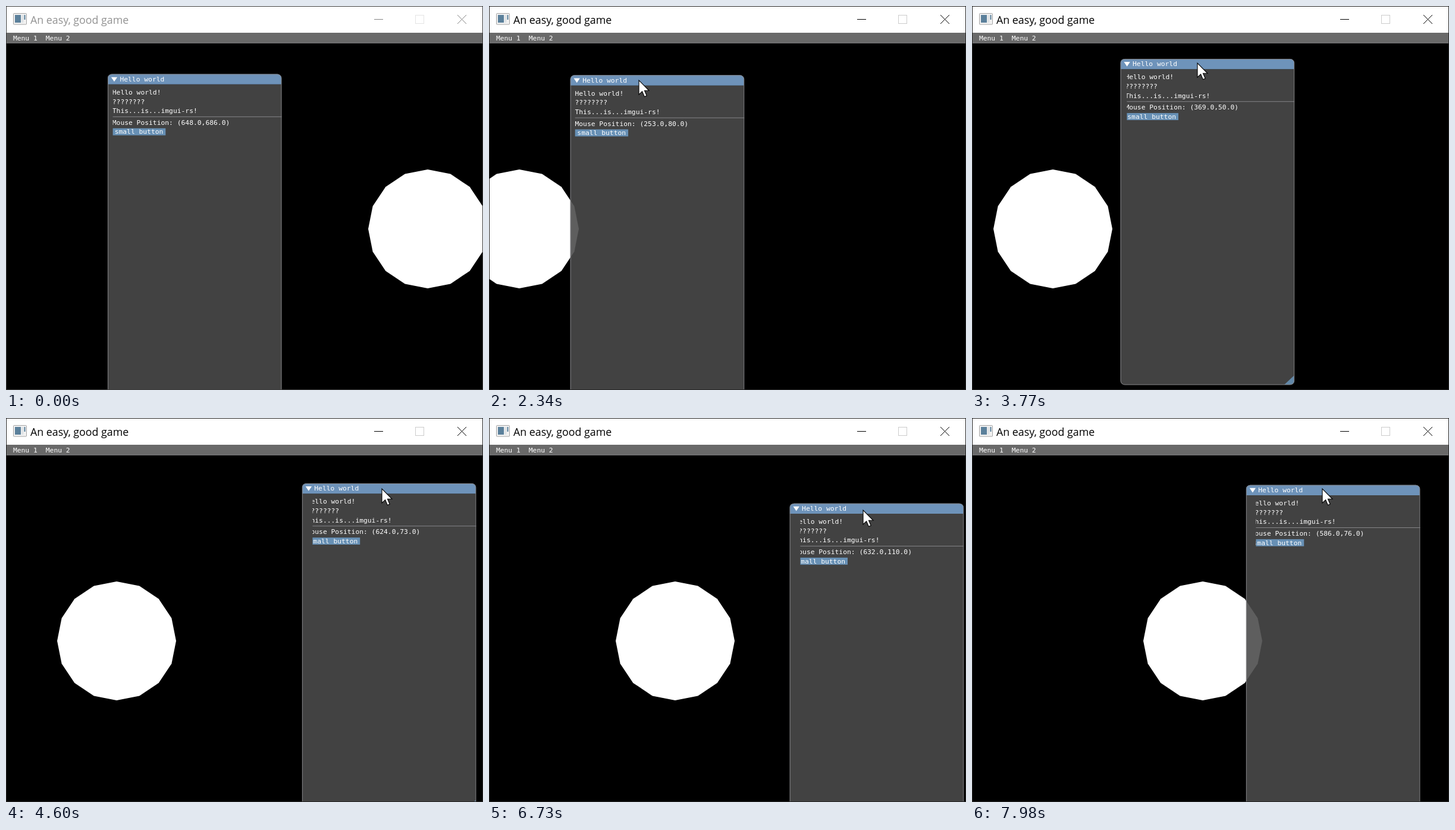
Recreate the animation shown at these times as an HTML page. Size 802 by 646 pixels, loop 8 s.

```html
<!DOCTYPE html>
<html lang="en">
<head>
<meta charset="utf-8">
<title>An easy, good game</title>
<style>
  html, body { margin: 0; width: 100%; height: 100%; overflow: hidden; background: #000; }
  svg { display: block; width: 100vw; height: 100vh; }
  .ui { font: 11.63px "DejaVu Sans Mono", monospace; fill: #fff; }
  .caption { font: 17.8px "Open Sans", "Noto Sans", sans-serif; }
  .line { fill: none; stroke: #858588; stroke-width: 1; vector-effect: non-scaling-stroke; }
</style>
</head>
<body>
<svg viewBox="0 0 802 646">
  <defs>
    <clipPath id="client"><rect x="1" y="45" width="800" height="600"/></clipPath>
    <clipPath id="stage"><rect x="1" y="1" width="800" height="644"/></clipPath>
    <clipPath id="inner"><rect id="innerRect" y="45" width="296" height="600"/></clipPath>
  </defs>

  <rect width="802" height="646" fill="#000"/>

  <g clip-path="url(#client)">
    <polygon id="ball" fill="#fff"/>

    <g class="ui" transform="translate(1 45) scale(.9735 .9135)">
      <rect width="822" height="19" fill="#696969"/>
      <path class="line" d="M0 18.8H822"/>
      <text x="11.2" y="13.7">Menu 1</text>
      <text x="67.6" y="13.7">Menu 2</text>
    </g>

    <g class="ui panel">
      <path d="M0 19V593a7 7 0 0 0 7 7H293a7 7 0 0 0 7-7V19z" fill="#4b4b4b" fill-opacity=".89"/>
      <path d="M0 19V7a7 7 0 0 1 7-7H293a7 7 0 0 1 7 7V19z" fill="#6e93ba"/>
      <path d="M300 583V593a7 7 0 0 1-7 7H283z" fill="#6288a8"/>
      <rect class="line" x=".5" y=".5" width="299.5" height="599.5" rx="7"/>
      <path d="M6 5.6H16.6L11.3 14z"/>
      <text x="21" y="13.7">Hello world</text>
    </g>

    <g clip-path="url(#inner)">
      <g class="ui panel">
        <text x="8" y="37.8">Hello world!</text>
        <text x="8" y="54.8">????????</text>
        <text x="8" y="71.8">This...is...imgui-rs!</text>
        <path class="line" d="M8 78.6H300.5"/>
        <text id="mouse" x="8" y="93.6"></text>
        <rect x="8" y="99.8" width="92" height="13" fill="#6790b5"/>
        <text x="12" y="110.4">small button</text>
      </g>
    </g>
  </g>

  <rect x="1" y="1" width="800" height="44" fill="#fff"/>
  <g>
    <rect x="12.5" y="12.5" width="22" height="18.5" rx="1" fill="#f2f2f2" stroke="#a3a3a3"/>
    <rect x="15" y="15" width="10" height="13" fill="#5b809b"/>
    <rect x="26" y="15" width="3.5" height="13" fill="#dfe3e6"/>
    <rect x="30.5" y="15" width="2" height="8" fill="#5b809b"/>
  </g>
  <text id="caption" class="caption" x="41" y="30">An easy, good game</text>
  <path id="buttons" d="M619 22.5H634M759 15L774 30M774 15L759 30" fill="none"/>
  <rect id="maximize" x="688.5" y="15.5" width="14" height="14" fill="none"/>
  <rect id="frame" x=".5" y=".5" width="801" height="645" fill="none"/>

  <g clip-path="url(#stage)">
    <path id="cursor" d="M0 0V24L5.6 18.7L9.4 27.6L13.2 26L9.5 17.3H17z"
          fill="#fff" stroke="#000" stroke-width="1.1"/>
  </g>
</svg>

<script>
const LOOP = 8000;
const GRAB_TIME = 1760;
const GRAB = { x: 113.6, y: 1.9 };
const HOME = { x: 174.6, y: 76.1 };
const CURSOR_LEAD = 24;

// Pointer path in client pixels: time, x, y
const PATH = [
  [0, 648, 686], [250, 648, 686], [800, 560, 400], [1250, 400, -36],
  [1640, 294, 64], [1750, 288, 78], [1900, 288, 78], [2340, 253, 80],
  [2500, 238, 72], [2900, 188, 45], [3290, 224, 29], [3420, 258, 24],
  [3770, 369, 50], [4100, 493, 55], [4600, 624, 73], [4950, 715, 81],
  [5520, 796, 86], [5750, 806, 91], [6200, 742, 104], [6580, 660, 110],
  [6730, 632, 110], [7100, 582, 107], [7400, 574, 104], [7800, 579, 88],
  [7980, 586, 76], [8100, 600, 68]
];

const $ = id => document.getElementById(id);
const panels = document.querySelectorAll('.panel');

function set(el, attrs) {
  for (const name in attrs) el.setAttribute(name, attrs[name]);
}

// Smooth curve through the path keys
function pointer(t) {
  let i = 0;
  while (i < PATH.length - 2 && t >= PATH[i + 1][0]) i++;
  const a = PATH[i], b = PATH[i + 1];
  const before = PATH[i - 1] || a, after = PATH[i + 2] || b;
  const span = b[0] - a[0], u = (t - a[0]) / span;
  const at = k => {
    const m0 = (b[k] - before[k]) / (b[0] - before[0]) * span;
    const m1 = (after[k] - a[k]) / (after[0] - a[0]) * span;
    const d = b[k] - a[k];
    return a[k] + u * (m0 + u * (3 * d - 2 * m0 - m1 + u * (m0 + m1 - 2 * d)));
  };
  return { x: Math.round(at(1)), y: Math.round(at(2)) };
}

function ballPoints(cx) {
  return Array.from({ length: 16 }, (_, i) => {
    const a = i * Math.PI / 8;
    return `${(cx + 100 * Math.cos(a)).toFixed(2)},${(375 + 100 * Math.sin(a)).toFixed(2)}`;
  }).join(' ');
}

function render(t) {
  const active = t >= GRAB_TIME;
  const mouse = pointer(t);
  const tip = pointer(t + CURSOR_LEAD);
  const pos = active ? { x: mouse.x - GRAB.x, y: mouse.y - GRAB.y } : HOME;

  const cx = t < 1510 ? 709 + t * .0605 : 51 + (t - 2340) * .0597;
  set($('ball'), { points: ballPoints(Math.round(cx)) });

  const place = `translate(1 45) scale(.9735 .9135) translate(${pos.x} ${pos.y})`;
  panels.forEach(p => set(p, { transform: place }));
  set($('innerRect'), { x: pos.x + 5 });
  $('mouse').textContent = `Mouse Position: (${mouse.x}.0,${Math.max(0, mouse.y)}.0)`;

  set($('caption'), { fill: active ? '#000' : '#929292' });
  set($('buttons'), { stroke: active ? '#000' : '#858585' });
  set($('maximize'), { stroke: active ? '#ccc' : '#e4e4e4' });
  set($('frame'), { stroke: active ? '#262626' : '#3d3d3d' });
  set($('cursor'), { transform: `translate(${tip.x + 1} ${tip.y + 45})` });
}

const start = performance.now();
function tick() {
  render((performance.now() - start) % LOOP);
  requestAnimationFrame(tick);
}
render(0);
requestAnimationFrame(tick);
</script>
</body>
</html>
```
